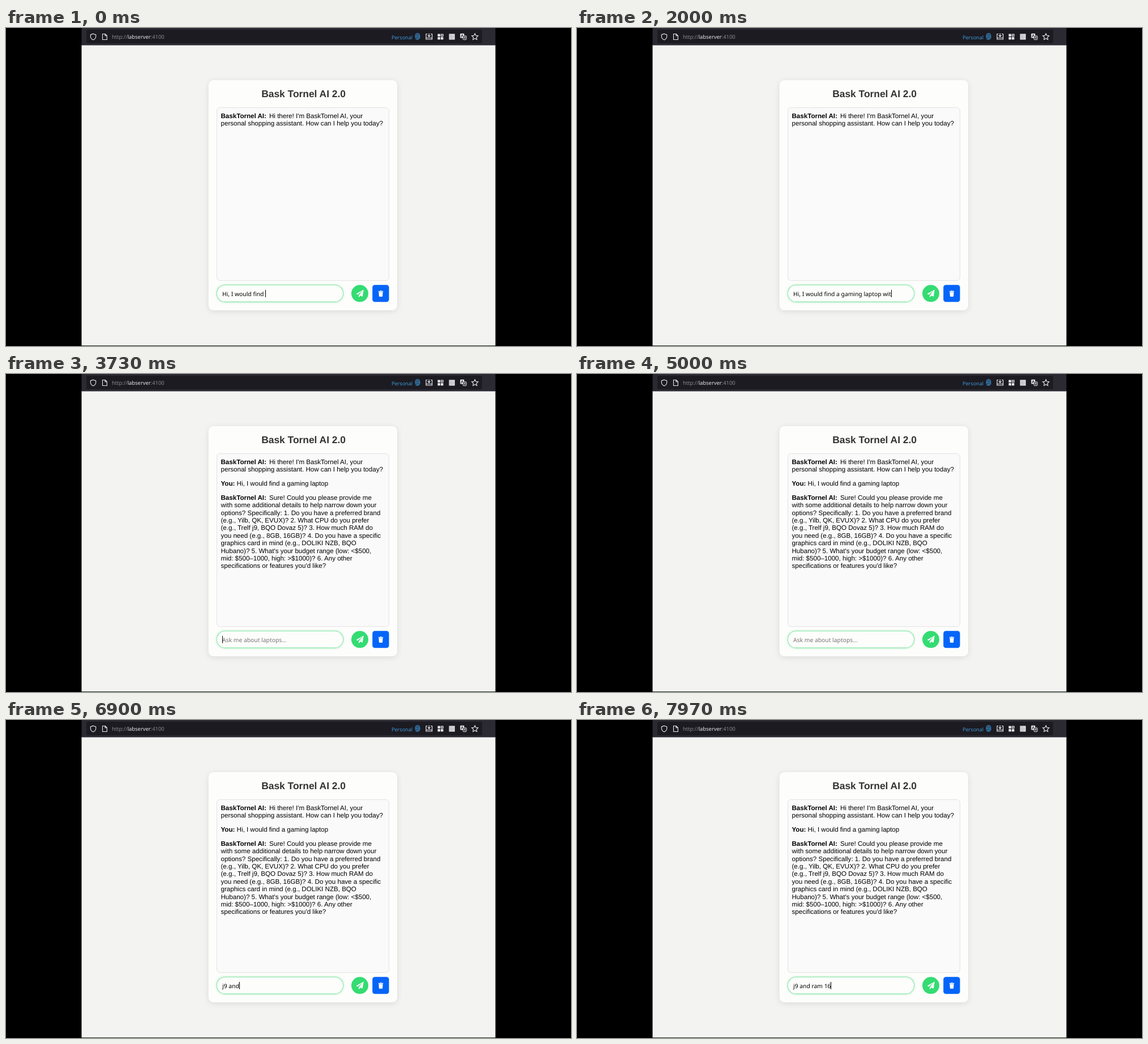
Recreate the animation shown at these times as an HTML page with a canvas. Size 998 by 561 pixels, loop 8000 ms.

```html
<!DOCTYPE html>
<html lang="en">
<head>
<meta charset="utf-8">
<title>Shopping chat</title>
<style>
  html, body { margin: 0; width: 100%; height: 100%; overflow: hidden; background: #000; }
  canvas { display: block; }
</style>
</head>
<body>
<canvas id="stage" width="998" height="561"></canvas>
<script>
const ctx = document.getElementById('stage').getContext('2d');
ctx.textRendering = 'geometricPrecision';
const LOOP = 8000, SENT = 2560, ANSWERED = 3660, BLINK = 530;
const SANS = '"Liberation Sans", Arial, sans-serif';
const UI = '"Noto Sans", "Open Sans", sans-serif';
const BODY = `11.59px ${SANS}`, BOLD = `bold ${BODY}`, INPUT = `10.34px ${UI}`;
const LINE = 13.35, LEFT = 379.5, BOT = 'BaskTornel AI:';

const answer = [
  'Sure! Could you please provide me',
  'with some additional details to help narrow down your',
  'options? Specifically: 1. Do you have a preferred brand',
  '(e.g., Yilb, QK, EVUX)? 2. What CPU do you prefer',
  '(e.g., Trelf j9, BQO Dovaz 5)? 3. How much RAM do',
  'you need (e.g., 8GB, 16GB)? 4. Do you have a specific',
  'graphics card in mind (e.g., DOLIKI NZB, BQO',
  "Hubano)? 5. What's your budget range (low: <$500,",
  'mid: $500–1000, high: >$1000)? 6. Any other',
  "specifications or features you'd like?"
];

// Keyboard history: time, field content, caret blinking
const edits = [{ at: -100, text: 'Hi, I would find ', caret: true }];
const edit = (at, text, caret = true) => edits.push({ at, text, caret });

const asked = 'Hi, I would find a gaming laptop';
const typed = asked + ' wit';
for (let n = 18; n <= typed.length; n++) edit(130 + (n - 18) * 101, typed.slice(0, n));
for (let n = 1; n <= 4; n++) edit(2050 + n * 70, typed.slice(0, -n));
edit(SENT, '', false);
edit(3250, '');
[5900, 6050, 6450, 6620, 6760, 6900, 7080, 7220, 7350, 7500, 7640, 7800, 7930]
  .forEach((at, i) => edit(at, 'j9 and ram 16'.slice(0, i + 1)));

function text(str, x, y, font, color, align = 'left') {
  ctx.font = font;
  ctx.fillStyle = color;
  ctx.textAlign = align;
  ctx.fillText(str, x, y);
  return x + ctx.measureText(str).width;
}

function rect(x, y, w, h, color) {
  ctx.fillStyle = color;
  ctx.fillRect(x, y, w, h);
}

function box(x, y, w, h, r, fill, stroke, width = 1) {
  ctx.beginPath();
  ctx.roundRect(x, y, w, h, r);
  if (fill) { ctx.fillStyle = fill; ctx.fill(); }
  if (stroke) { ctx.strokeStyle = stroke; ctx.lineWidth = width; ctx.stroke(); }
}

function shadow(color, blur, dy = 0) {
  ctx.shadowColor = color;
  ctx.shadowBlur = blur;
  ctx.shadowOffsetY = dy;
}

function line(d, color, width = 1) {
  ctx.strokeStyle = color;
  ctx.lineWidth = width;
  ctx.stroke(new Path2D(d));
}

function shape(d, color) {
  ctx.fillStyle = color;
  ctx.fill(new Path2D(d));
}

function star(cx, cy, r) {
  ctx.beginPath();
  for (let i = 0; i < 10; i++) {
    const a = i * Math.PI / 5 - Math.PI / 2, k = i % 2 ? r * 0.48 : r;
    ctx.lineTo(cx + k * Math.cos(a), cy + k * Math.sin(a));
  }
  ctx.closePath();
  ctx.lineWidth = 1.1;
  ctx.stroke();
}

function toolbar() {
  const pale = '#e9e9ee', blue = '#3f9fe0';
  rect(133.5, 0, 731, 30, '#2b2a33');
  box(142, 3, 699, 24, 3, '#1c1b22');

  line('M154 10.2 L158.7 12 V15 Q158.5 19 154 21 Q149.5 19 149.3 15 V12 Z', pale, 1.1);
  line('M170.5 10.5 H175.3 L178.3 13.5 V20.5 H170.5 Z M175 10.5 V13.8 H178.3', pale, 1.1);

  const font = `9.45px "Open Sans", ${UI}`;
  let x = text('http://', 187, 19.3, font, '#92929b');
  x = text('labserver', x, 19.3, font, '#f1f1f5');
  text(':4100', x, 19.3, font, '#92929b');
  text('Personal', 681, 19.5, `9.1px "Open Sans", ${UI}`, blue);

  // Fingerprint: nested loops, open at the sides
  for (const r of [0.9, 2.4, 3.9]) {
    const top = 14 - r * 0.2, low = 17 + r * 0.2;
    line(`M${727 - r} ${low} V${top} A${r} ${r} 0 0 1 ${727 + r} ${top} V${low}`, blue, 0.9);
    line(`M${727 - r} ${low + 1.2} Q727 ${low + r} ${727 + r} ${low + 0.4}`, blue, 0.9);
  }

  line('M744.5 10.5 H742 V20 H752.6 V10.5 H750 M742 17.5 H752.6', pale, 1.2);
  line('M747.3 9.5 V15.3 M744.9 13 L747.3 15.5 L749.7 13', pale, 1.2);

  for (const [px, py] of [[762.5, 10.5], [762.5, 16], [768, 16]]) rect(px, py, 4.4, 4.4, pale);
  line('M768.6 11.1 H772 V14.4 H768.6 Z', pale, 1.3);

  rect(782.5, 10.3, 10.3, 10.3, '#d6d6da');
  line('M784 13 H788 M784 15.5 H791 M784 18 H789', '#aaaab0', 0.8);

  box(802.3, 9.8, 7, 7.6, 1, pale);
  text('A', 805.8, 16.3, `bold 7px ${SANS}`, '#1c1b22', 'center');
  box(807.2, 13.8, 6, 6.8, 1, '#1c1b22', pale, 1);
  line('M808.5 16 H812 M810.3 15 V16 M811.5 16 L808.7 19 M809 17 L812 19', pale, 0.8);

  ctx.strokeStyle = pale;
  star(828.3, 15.6, 5.9);
}

function message(name, str, y, color = '#000') {
  const end = text(name, LEFT, y, BOLD, color);
  text(str, name === BOT ? 465 : end + 3.2, y, BODY, color);
}

function chat(t) {
  let y = 158.8;
  message(BOT, "Hi there! I'm BaskTornel AI, your", y);
  text('personal shopping assistant. How can I help you today?', LEFT, y += LINE, BODY, '#000');
  if (t < SENT) return;
  message('You:', asked, y += 24.95);
  y += 24.95;
  if (t < ANSWERED) return message(BOT, '...', y, '#282828');
  message(BOT, answer[0], y);
  for (const row of answer.slice(1)) text(row, LEFT, y += LINE, BODY, '#000');
}

function field(t) {
  shadow('rgba(37,211,102,.5)', 3.6);
  box(371.9, 453.2, 224, 30.2, 15.1, '#7fe6a0');
  shadow('transparent', 0);
  box(372.7, 454, 222.4, 28.6, 14.3, '#fdfdfc');

  const now = edits.findLast(e => e.at <= t);
  let end = 382;
  if (now.text) end = text(now.text, 382, 472.6, INPUT, '#000');
  else text('Ask me about laptops...', 382, 472.6, INPUT, '#757575');
  const on = Math.floor((t - now.at) / BLINK) % 2 === 0;
  if (now.caret && on) rect(Math.round(end), 462, 1, 13, '#000');
}

function buttons() {
  box(610, 453.3, 30, 30, 15, '#34dc72');
  shape('M631.8 461.6 L618.4 469 L621.3 470.4 L629.5 463.3 L623 471.7 V475.3 L625.8 472.2 L629.8 473.8 Z', '#fff');
  box(647.2, 453.3, 29.3, 30, 4.4, '#0565f8');
  shape('M657.8 464 H660.3 L660.9 463.2 H663.1 L663.7 464 H666.2 V465.4 H657.8 Z', '#fff');
  shape('M658.4 466.1 H665.6 L665.1 473 Q665 473.9 664.1 473.9 H659.9 Q659 473.9 658.9 473 Z', '#fff');
}

function draw(t) {
  rect(0, 0, 998, 561, '#000');
  rect(133.5, 30, 731, 530, '#f3f3f1');
  rect(133.5, 29.5, 731, 1, '#2a2535');
  rect(133.5, 560, 731, 1, '#20341f');
  toolbar();

  shadow('rgba(0,0,0,.1)', 11, 2);
  box(357.7, 92, 333.3, 406, 8.7, '#fdfdfc');
  shadow('transparent', 0);
  text('Bask Tornel AI 2.0', 600, 122.3, `bold 17.4px ${SANS}`, '#333', 'right');
  box(372.4, 140.4, 304, 305.2, 5.8, '#fafafa', '#dcdcdf', 0.8);

  chat(t);
  field(t);
  buttons();
}

const start = performance.now();
function frame() {
  draw((performance.now() - start) % LOOP);
  requestAnimationFrame(frame);
}
frame();
</script>
</body>
</html>
```
